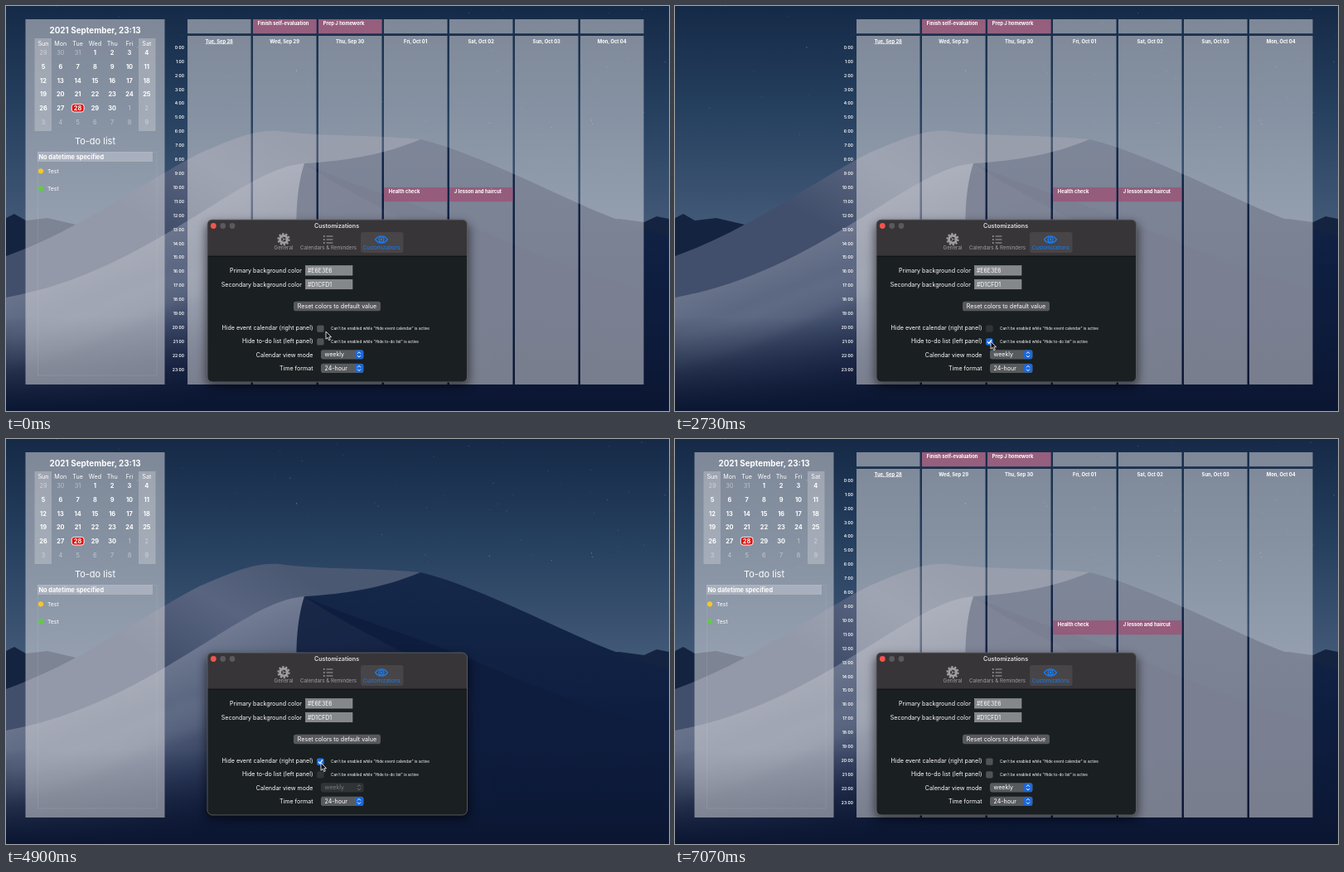
Animation of 800 by 489 pixels, one loop 7140 ms. Source, as an HTML page:

```html
<!DOCTYPE html>
<html lang="en">
<head>
<meta charset="utf-8">
<title>Desktop calendar settings</title>
<style>
html, body { margin: 0; width: 100%; height: 100%; overflow: hidden; background: #0c1835; }
svg { display: block; width: 100vw; height: 100vh; }
text { font-family: Inter, "Liberation Sans", sans-serif; fill: #fff; white-space: pre; }
</style>
</head>
<body>
<svg id="stage" viewBox="0 0 800 489">
  <defs>
    <linearGradient id="sky" x2="0" y2="1">
      <stop stop-color="#152a47"/><stop offset=".25" stop-color="#253f5e"/><stop offset=".55" stop-color="#435a78"/>
    </linearGradient>
    <linearGradient id="back" gradientUnits="userSpaceOnUse" x1="330" y1="150" x2="240" y2="300">
      <stop stop-color="#4b5872"/><stop offset=".45" stop-color="#596580"/><stop offset="1" stop-color="#424f6c"/>
    </linearGradient>
    <linearGradient id="front" gradientUnits="userSpaceOnUse" x1="250" y1="225" x2="330" y2="440">
      <stop stop-color="#747d94"/><stop offset=".35" stop-color="#58647f"/><stop offset=".75" stop-color="#2b3858"/><stop offset="1" stop-color="#121d3b"/>
    </linearGradient>
    <linearGradient id="shade" gradientUnits="userSpaceOnUse" x1="0" y1="165" x2="0" y2="489">
      <stop stop-color="#15284a"/><stop offset=".5" stop-color="#0e1e40"/><stop offset="1" stop-color="#0b1631"/>
    </linearGradient>
    <linearGradient id="floor" x2="0" y2="1">
      <stop stop-color="#0b1632" stop-opacity="0"/><stop offset="1" stop-color="#0b1632"/>
    </linearGradient>
    <filter id="soft"><feGaussianBlur stdDeviation="6"/></filter>
  </defs>
  <g id="wallpaper"></g><g id="left"></g><g id="right"></g><g id="dialog"></g>
  <path id="cursor" d="M0 0V9.2L2.2 7.3 3.7 10.6 5.3 9.9 3.8 6.7H6.6Z" fill="#111" stroke="#fff" stroke-width=".8"/>
</svg>
<script>
const $ = id => document.getElementById(id);
const rect = (x, y, w, h, fill, more = '') =>
  `<rect x="${x}" y="${y}" width="${w}" height="${h}" fill="${fill}" ${more}/>`;
const path = (d, fill, more = '') => `<path d="${d}" fill="${fill}" ${more}/>`;
const dot = (x, y, r, fill, more = '') => `<circle cx="${x}" cy="${y}" r="${r}" fill="${fill}" ${more}/>`;
const label = (x, y, size, s, weight = 400, anchor = 'start', more = '') =>
  `<text x="${x}" y="${y}" font-size="${size}" font-weight="${weight}" text-anchor="${anchor}" ${more}>${s}</text>`;
const line = (d, color, width) =>
  path(d, 'none', `stroke="${color}" stroke-width="${width}" stroke-linecap="round" stroke-linejoin="round"`);
const PANEL = 'rgba(230,227,230,.5)';

function wallpaper() {
  let seed = 7, out = rect(0, 0, 800, 489, 'url(#sky)');
  const rnd = () => (seed = seed * 16807 % 2147483647) / 2147483647;
  for (let i = 0; i < 70; i++)
    out += dot(rnd() * 800, rnd() * 160, .3 + rnd() * .3, '#b5c5d8', `opacity="${.2 + rnd() * .4}"`);
  return out +
    path('M0 256L10 251 24 259 50 256 110 270V310H0ZM680 262L740 257 770 261 785 254 800 257V310H680Z', '#142440') +
    path('M0 302C90 270 170 210 235 177C275 160 300 149 330 151C380 158 440 155 500 161L520 489H0Z', 'url(#back)') +
    path('M500 161C555 174 630 211 690 238S770 268 800 278V489H330L360 190C410 187 455 180 500 161Z', 'url(#shade)') +
    path('M0 352C110 332 190 277 265 231C305 207 330 193 360 190C410 225 480 257 560 300L600 489H0Z', 'url(#front)') +
    path('M360 190C420 218 500 239 580 274S720 330 800 350V489H400C350 380 340 250 360 190Z', '#0e1d3e', 'opacity=".88"') +
    path('M0 392C80 380 150 335 240 310V350C160 370 100 420 0 436Z', '#7d869b', 'opacity=".22" filter="url(#soft)"') +
    rect(0, 375, 800, 114, 'url(#floor)');
}

function leftPanel() {
  const x = i => 45 + i * 20.8;
  let out = rect(23.5, 16, 168, 441, PANEL) +
    label(107.5, 33, 9.9, '2021 September, 23:13', 700, 'middle');
  for (const sx of [34.5, 160]) out += rect(sx, 39, 20.5, 112, 'rgba(225,223,228,.32)');
  ['Sun', 'Mon', 'Tue', 'Wed', 'Thu', 'Fri', 'Sat'].forEach((d, i) => {
    out += label(x(i), 48, 7.2, d, 400, 'middle');
  });
  out += rect(79.3, 118.4, 14.8, 9.6, '#e0100c', 'rx="3" stroke="#fff" stroke-width=".9"');
  for (let i = 0; i < 42; i++) {
    const n = i - 2, day = n < 1 ? n + 31 : n > 30 ? n - 30 : n, own = n === day;
    out += label(x(i % 7), 59 + (i / 7 | 0) * 16.75, 7.4, day, own ? 700 : 400, 'middle', own ? '' : 'opacity=".48"');
  }
  return out +
    label(107.5, 167, 11, 'To-do list', 400, 'middle') +
    rect(38, 176, 139, 12, 'rgba(235,233,238,.3)') +
    rect(38.5, 176.5, 143.5, 269.5, 'none', 'stroke="#fff" stroke-opacity=".08"') +
    label(39.5, 185, 7.35, 'No datetime specified', 700) +
    dot(42, 199.3, 3.1, '#f5c72a') + label(50, 202, 6.8, 'Test') +
    dot(42, 220.4, 3.1, '#5fcc45') + label(50, 223, 6.8, 'Test');
}

function rightPanel() {
  const x = i => 219 + i * 79;
  const days = ['Tue, Sep 28', 'Wed, Sep 29', 'Thu, Sep 30', 'Fri, Oct 01', 'Sat, Oct 02', 'Sun, Oct 03', 'Mon, Oct 04'];
  const event = (i, y, s) => rect(x(i), y, 76.5, 17.2, 'rgba(170,60,105,.55)') + label(x(i) + 5.8, y + 7.3, 5.85, s, 700);
  let out = '';
  days.forEach((d, i) => {
    out += rect(x(i), 16, 76.5, 17.2, PANEL) + rect(x(i), 36, 76.5, 421, PANEL) +
      label(x(i) + 38.2, 44.5, 5.8, d, 700, 'middle', i ? '' : 'text-decoration="underline"');
  });
  for (let h = 0; h < 24; h++) out += label(215, 51.8 + h * 16.91, 4.9, h + ':00', 600, 'end');
  return out + event(1, 16, 'Finish self-evaluation') + event(2, 16, 'Prep J homework') +
    event(3, 219, 'Health check') + event(4, 219, 'J lesson and haircut');
}

function checkbox(y, on, pressed, disabled) {
  const fill = on ? (pressed ? '#4c97ff' : '#1b72ee') : pressed ? '#85888a' : disabled ? '#303436' : '#505356';
  return rect(375.2, y, 8.4, 8.4, fill, 'rx="1.9"') +
    (on ? line(`M377.2 ${y + 4.4}L378.8 ${y + 6.2} 381.7 ${y + 2.2}`, '#fff', 1.1) : '');
}

function dropdown(y, s, disabled) {
  const arrows = line(`M424.3 ${y + 4.3}L426 ${y + 2.5} 427.7 ${y + 4.3}M424.3 ${y + 7}L426 ${y + 8.8} 427.7 ${y + 7}`,
    disabled ? '#707375' : '#fff', .95);
  return rect(380, y, 51.5, 11.2, disabled ? '#303436' : '#585b5e', 'rx="2.8"') +
    (disabled ? '' : rect(421, y + .4, 10.2, 10.4, '#1b68dc', 'rx="2.5"')) + arrows +
    label(384.5, y + 8.2, 7.1, s, 400, 'start', disabled ? 'opacity=".35"' : '');
}

function dialog({ hideLeft, hideRight, press }) {
  const GREY = '#a09ea2', BLUE = '#1a7cf2';
  const name = (y, s, x = 370.5) => label(x, y, 7.1, s, 400, 'end');
  const hint = (y, s) => label(392, y, 4.65, `Can't be enabled while "${s}" is active`);
  const tab = (x, s, color) => label(x, 294.4, 6.2, s, 400, 'middle', `style="fill:${color}"`);
  const field = (y, s) => rect(361.5, y, 56.5, 11.6, '#85888b', 'stroke="#a0a2a4" stroke-width=".5"') +
    label(364, y + 8.4, 6.9, s);
  let gear = dot(335, 281.7, 4.4, 'none', `stroke="${GREY}" stroke-width="3"`) +
    dot(335, 281.7, 6.6, 'none', `stroke="${GREY}" stroke-width="2" stroke-dasharray="2.3 1.85"`) +
    line('M335 281.7H339.5M335 281.7L332.6 277.8M335 281.7L332.6 285.6', GREY, .9);
  let list = '';
  for (const y of [278, 282, 286])
    list += dot(383.8, y, .9, GREY) + line(`M387 ${y}H394`, GREY, 1);
  const eye = line('M445.6 282C449.5 276.5 456.5 276.5 460.4 282C456.5 287.5 449.5 287.5 445.6 282Z', BLUE, 1.3) +
    dot(453, 282, 3, 'none', `stroke="${BLUE}" stroke-width="1.2"`) + dot(453, 282, 1.4, BLUE);
  return rect(241, 262, 318, 197, '#000', 'rx="8" opacity=".55" filter="url(#soft)"') +
    rect(243, 258, 313.5, 196, '#1a1f21', 'rx="6"') +
    path('M243 302V264Q243 258 249 258H550.5Q556.5 258 556.5 264V302Z', '#373538') +
    rect(243, 301.6, 313.5, .9, '#0c0e0f') +
    rect(243, 258, 313.5, 196, 'none', 'rx="6" stroke="#66676a" stroke-width=".8"') +
    dot(250.3, 265.5, 3.4, '#f4544d') + dot(261.7, 265.5, 3.4, '#5b595c') + dot(273, 265.5, 3.4, '#5b595c') +
    label(399, 267.7, 7.2, 'Customizations', 600, 'middle', 'opacity=".85"') +
    rect(428, 273, 51.5, 25, '#474548', 'rx="3"') + gear + list + eye +
    tab(335, 'General', GREY) + tab(389, 'Calendars &amp; Reminders', GREY) + tab(453.3, 'Customizations', BLUE) +
    name(322, 'Primary background color', 357) + field(313.5, '#E6E3E6') +
    name(338.7, 'Secondary background color', 357) + field(330.2, '#D1CFD1') +
    rect(347, 356.8, 105, 11.4, '#58595c', 'rx="2.8"') +
    label(399.5, 365, 7.1, 'Reset colors to default value', 400, 'middle') +
    name(391.2, 'Hide event calendar (right panel)') + checkbox(385.4, hideRight, press === 1, hideLeft) +
    hint(391.2, 'Hide event calendar') +
    name(407, 'Hide to-do list (left panel)') + checkbox(401.2, hideLeft, press === 2, hideRight) +
    hint(407, 'Hide to-do list') +
    name(423.5, 'Calendar view mode') + dropdown(415.2, 'weekly', hideRight) +
    name(440, 'Time format') + dropdown(431.8, '24-hour', false);
}

// Cursor stops: time, x, y
const stops = [[0, 386, 393], [630, 382, 390], [1400, 382, 390], [1960, 381, 405], [3500, 381, 405],
  [4200, 380, 391], [6580, 380, 391], [6930, 640, 520], [7140, 640, 520]];

function cursorAt(t) {
  const i = stops.findIndex(s => s[0] > t), a = stops[i - 1], b = stops[i];
  const u = (t - a[0]) / (b[0] - a[0]), e = u * u * (3 - 2 * u);
  return [1, 2].map(k => a[k] + (b[k] - a[k]) * e);
}

$('wallpaper').innerHTML = wallpaper();
$('left').innerHTML = leftPanel();
$('right').innerHTML = rightPanel();

let shown = '';
function draw(now) {
  const t = Math.floor(now % 7140 / 70) * 70;
  const within = (a, b) => t >= a && t < b;
  const state = {
    hideLeft: within(2170, 3150),
    hideRight: within(4620, 6440),
    press: within(2030, 2170) || within(3080, 3150) ? 2 : within(4480, 4620) || within(6370, 6440) ? 1 : 0
  };
  const key = JSON.stringify(state);
  if (key !== shown) {
    shown = key;
    $('left').style.display = state.hideLeft ? 'none' : '';
    $('right').style.display = state.hideRight ? 'none' : '';
    $('dialog').innerHTML = dialog(state);
  }
  $('cursor').setAttribute('transform', `translate(${cursorAt(t)})`);
}

const start = performance.now();
function tick() {
  draw(performance.now() - start);
  requestAnimationFrame(tick);
}
tick();
</script>
</body>
</html>
```
